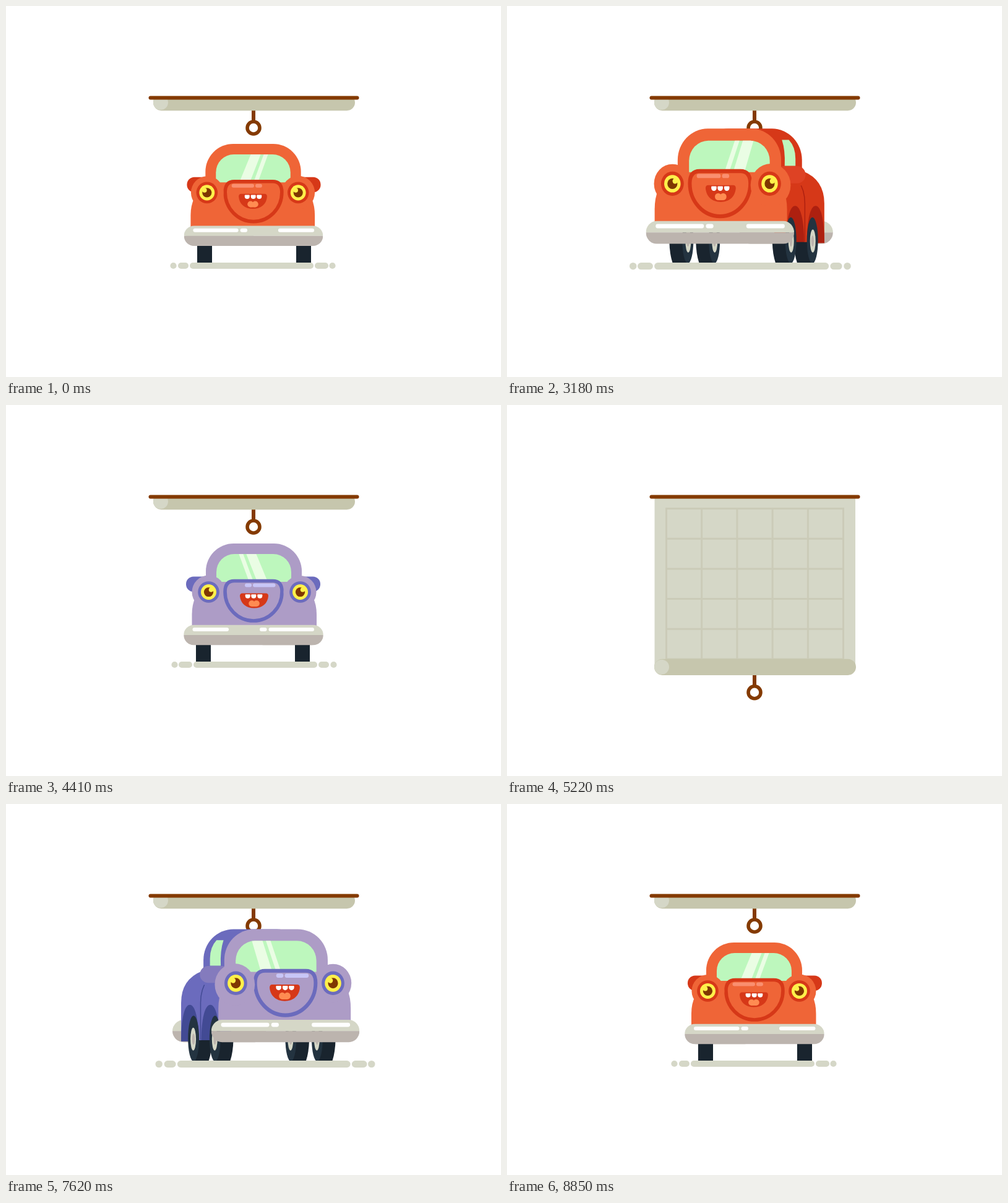
Recreate the animation shown at these times as an HTML page with a canvas. Size 800 by 600 pixels, loop 8880 ms.

```html
<!DOCTYPE html>
<html lang="en">
<head>
<meta charset="utf-8">
<title>Car blueprint</title>
<style>
html, body { margin: 0; width: 100%; height: 100%; overflow: hidden; background: #fff; }
canvas { display: block; }
</style>
</head>
<body>
<canvas id="stage" width="800" height="600"></canvas>
<script>
const ctx = document.getElementById('stage').getContext('2d');
const LOOP = 8880, HALF = 4460, SETTLED = 4440;

const RED = { main: '#ef6537', dark: '#d63818', deep: '#ad2010', mid: '#de4224', shine: '#fa8f70', flipHood: false };
const PURPLE = { main: '#ad9cc6', dark: '#6b6bbd', deep: '#424a94', mid: '#847bbd', shine: '#c8c6f7', flipHood: true };
const PAPER = '#d5d7c7', ROLL = '#c6c6ad', GRID = '#cbcbb8', WOOD = '#843a00';
const STEEL = '#bcb4ae', TYRE = '#19242e', TYRE_SIDE = '#233340', GLASS = '#bdf7bd';

const clamp = u => Math.max(0, Math.min(1, u));
const span = (t, a, b) => clamp((t - a) / (b - a));
const smooth = u => u * u * (3 - 2 * u);
const cubic = u => u < .5 ? 4 * u ** 3 : 1 - 4 * (1 - u) ** 3;
const mix = (a, b, u) => a + (b - a) * u;

function group(draw) { ctx.save(); draw(); ctx.restore(); }

function box(x1, y1, x2, y2, color, r = 0) {
  ctx.fillStyle = color;
  ctx.beginPath();
  ctx.roundRect(x1, y1, x2 - x1, y2 - y1, r);
  ctx.fill();
}
const pill = (x1, y1, x2, y2, color) => box(x1, y1, x2, y2, color, (y2 - y1) / 2);

function oval(x, y, rx, ry, color) {
  ctx.fillStyle = color;
  ctx.beginPath();
  ctx.ellipse(x, y, Math.max(rx, 0), ry, 0, 0, 7);
  ctx.fill();
}
const disc = (x, y, r, color) => oval(x, y, r, r, color);

function shape(d, color) {
  ctx.fillStyle = color;
  ctx.fill(new Path2D(d));
}
function line(d, color, width) {
  ctx.strokeStyle = color;
  ctx.lineWidth = width;
  ctx.stroke(new Path2D(d));
}

/* ---------- car: x = 0 is its middle, y = 0 the ground, facing right ---------- */

function shadow(p) {
  const e = 25 * p;
  pill(-103 - e, 0, 97 + e, 10, PAPER);
  pill(-122 - e, 0, -105 - e, 10, PAPER);
  pill(99 + e, 0, 121 + e, 10, PAPER);
  disc(-129.5 - e, 5, 5.1, PAPER);
  disc(127.5 + e, 5, 5.1, PAPER);
}

// edge is the outer left side of the tyre; the tread runs to its right, below the body
function wheel(edge, p) {
  const w = mix(24, 26, p), rx = 8 * p;
  ctx.save();
  ctx.beginPath();
  ctx.rect(-200, -70, 400, 70);
  ctx.clip();
  shape(`M${edge} -29.500H${edge + w + .5 * p}Q${edge + w} -12 ${edge + w - 4 * p} 0H${edge}Z`, TYRE);
  oval(edge, -32, rx, 33, TYRE_SIDE);
  oval(edge - .5 * p, -31, 4 * p, 16.5, PAPER);
  oval(edge - .2 * p, -31, 2 * p, 8, STEEL);
  ctx.restore();
}

function bumper(x1, x2) {
  group(() => {
    ctx.beginPath();
    ctx.roundRect(x1, -59.2, x2 - x1, 32.4, 16.2);
    ctx.clip();
    ctx.fillStyle = PAPER;
    ctx.fillRect(x1, -60, x2 - x1, 17);
    ctx.fillStyle = STEEL;
    ctx.fillRect(x1, -43, x2 - x1, 17);
  });
}

function side(c, p) {
  const back = mix(-94, -122, p), x = v => mix(v + 20, v, p);
  bumper(mix(-110, -134.5, p), 0);
  if (p > .02) {
    shape(`M-50 -130H${x(-92)}Q${back} -118 ${back} -84V-28H-50Z`, c.dark);
    for (const [m, hw] of [[-80, 13], [-109.5, 12.5]]) {
      const a = x(m) - hw * p, b = x(m) + hw * p;
      shape(`M${a} -28C${a} -60 ${x(m) - 8 * p} -81 ${x(m)} -81S${b} -60 ${b} -28Z`, c.deep);
    }
    line(`M${x(-84)} -118Q${x(-94)} -104 ${x(-94)} -84V-30`, c.deep, 1.3);
  }
}

function cabinShape(color) {
  shape('M-78 -110V-146A45 45 0 0 1 -33 -191H32A45 45 0 0 1 77 -146V-110Z', color);
}

function cabin(c, p) {
  if (p > .02) {
    group(() => {
      ctx.translate(-15 * p, 0);
      ctx.scale(1 - .04 * p, 1);
      cabinShape(c.dark);
    });
    ctx.globalAlpha = clamp(p * 3 - 1);
    shape('M-61 -175H-71Q-80.5 -165 -80.5 -148V-138H-65Q-66 -160 -61 -175Z', GLASS);
    ctx.globalAlpha = 1;
  }
  const m = mix(-108, -95, p);
  box(m, -137.5, -50, -113, p > .5 ? c.mid : c.dark, 12);
  box(40, -137.5, mix(109, 82, p), -113, c.dark, 12);
  group(() => {
    ctx.translate(15 * p, 0);
    ctx.scale(1 - .04 * p, 1);
    cabinShape(c.main);
    const d = 'M-61 -125V-145A29 29 0 0 1 -32 -174H31A29 29 0 0 1 60 -145V-125Z';
    shape(d, GLASS);
    ctx.clip(new Path2D(d));
    const k = -33 * p;
    shape(`M${-4 + k} -175H${12 + k}L-6 -129H-23Z`, '#eafde4');
    shape(`M${17 + k} -175H${24 + k}L7 -129H0Z`, '#eafde4');
  });
}

function eye(x, c) {
  disc(x, -112.5, 17.3, c.dark);
  disc(x, -112.5, 12.5, '#fff04a');
  disc(x, -112.5, 7.6, '#7f3700');
  disc(x - 4, -116.3, 3.8, '#fff04a');
}

function mouth() {
  shape('M-20 -110.5H18Q22 -110.5 22 -106C21 -94 12 -86.5 -1 -86.5S-23 -94 -24 -106Q-24 -110.5 -20 -110.5Z', '#d63818');
  for (const x of [-10.3, -.3, 9.3]) box(x - 4, -108.8, x + 4, -102.3, '#fff', [1, 1, 4, 4]);
  disc(-4.8, -94, 5, '#ff8c52');
  disc(2.8, -94, 5, '#ff8c52');
  box(-5, -95, 3, -89, '#ff8c52');
}

function front(c, p, dir) {
  const facing = flip => ctx.scale(flip ? -dir : dir, 1);
  ctx.translate(28 * p, 0);
  ctx.scale(1 - .055 * p, 1);
  box(-76, -129, 74, -58, c.main);
  shape('M-96 -104Q-102 -92 -102 -76V-50H99.500V-76Q99.500 -92 94 -104Z', c.main);
  disc(72.5, -112.5, 27 + p, c.main);
  const hood = 'M-31 -130.500H31Q46 -130.500 46 -113A46 47 0 0 1 -46 -113Q-46 -130.500 -31 -130.500Z';
  shape(hood, c.main);
  line(hood, c.dark, 5.6);
  group(() => {
    facing(c.flipHood);
    pill(-35.5, -126.5, 1, -120.5, c.shine);
    pill(3, -126.5, 14, -120.5, c.shine);
  });
  disc(-75 - 2 * p, -112.5 + 2 * p, 26.5 + 4 * p, c.main);
  eye(-75.5, c);
  eye(72.5, c);
  mouth();
  bumper(-112.8, 112.8);
  group(() => {
    facing(c.flipHood && dir < 0);
    for (const [a, b] of [[-98, -24.5], [-21.5, -10], [40, 98.5]]) pill(a, -55, b, -49, '#fff');
  });
}

function car(c, x, dir, scale, p, sway) {
  group(() => {
    ctx.translate(x, 415);
    ctx.scale(dir * scale, scale);
    shadow(p);
    wheel(mix(69, 36, p), p);
    wheel(mix(69, 74, p), p);
    const body = draw => group(() => { ctx.scale(1 - sway * .7, 1 + sway); draw(); });
    body(() => side(c, p));
    wheel(mix(-91, -104.5, p), p);
    wheel(mix(-91, -73.5, p), p);
    body(() => { cabin(c, p); front(c, p, dir); });
  });
}

/* ---------- pull-down screen with the drawing ---------- */

// path, start time of its pen
const strokes = [
  ['M477 253V244A44 44 0 0 0 433 200.500H364A44 44 0 0 0 320 244V253', 1006],
  ['M460 255V244A27 27 0 0 0 433 216.500H364A27 27 0 0 0 337 244V254', 1006],
  ['M510 331.500A16.500 16.500 0 0 1 510 364.500H291A16.500 16.500 0 0 1 291 331.500H510', 848],
  ['M399 324.500A47 47 0 0 0 446 278Q446 262 433 262H364Q351.500 262 351.500 278A47 47 0 0 0 399 324.500', 848],
  ['M285.500 331V307Q286 284 303 271A27 27 0 0 1 349 262H449A27 27 0 0 1 495 271Q514 284 514.500 307V331', 961],
  ['M298 276Q293 272 293 265Q293 253.500 304 253.500H317', 895],
  ['M501.500 276Q506.500 272 506.500 265Q506.500 253.500 494 253.500H480', 865],
  ['M341 278.500A12.800 12.800 0 0 0 315.400 278.500A12.800 12.800 0 0 0 341 278.500', 860],
  ['M482 278.500A12.800 12.800 0 0 0 456.400 278.500A12.800 12.800 0 0 0 482 278.500', 950],
  ['M288 365V387Q288 392.500 293 392.500H310Q315 392.500 315 387V365', 1006],
  ['M487 365V387Q487 392.500 492 392.500H509Q514 392.500 514 387V365', 948]
].map(([d, start]) => {
  const el = document.createElementNS('http://www.w3.org/2000/svg', 'path');
  el.setAttribute('d', d);
  return { path: new Path2D(d), length: el.getTotalLength(), start };
});

function trim(s, from, to, color) {
  if (to - from < .002) return;
  ctx.strokeStyle = color;
  ctx.setLineDash([(to - from) * s.length, s.length * 2]);
  ctx.lineDashOffset = -from * s.length;
  ctx.stroke(s.path);
}

function drawing(t) {
  const PEN = 1186, LAG = 198;
  ctx.lineCap = 'round';
  ctx.lineWidth = 2.8;
  const ends = strokes.map(s => [0, LAG].map(lag => smooth(span(t, s.start + lag, s.start + lag + PEN))));
  strokes.forEach((s, i) => trim(s, 0, ends[i][1], '#b5aa8c'));
  strokes.forEach((s, i) => trim(s, ends[i][1], ends[i][0], '#ffffe7'));
}

function screen(t) {
  const drop = 283 * (cubic(span(t, 60, 980)) - cubic(span(t, 2400, 2850)));
  const y = 156 + drop;
  line(`M400 ${y + 10}V${y + 32}`, WOOD, 6);
  line(`M410 ${y + 41}a10 10 0 1 1 -20 0a10 10 0 1 1 20 0`, WOOD, 5.6);
  group(() => {
    ctx.beginPath();
    ctx.rect(230, 148, 340, 400);
    ctx.clip();
    group(() => {
      ctx.beginPath();
      ctx.rect(238.5, 148, 324.5, y - 148);
      ctx.clip();
      box(238, 148, 564, y, PAPER);
      line('M257.500 167.500H543.500V411H257.500Z', GRID, 3);
      for (let i = 1; i < 5; i++) {
        const gx = 257.5 + 57.2 * i, gy = 167.5 + 48.7 * i;
        line(`M${gx} 167V411M257 ${gy}H544`, GRID, 3);
      }
      drawing(t);
    });
    pill(238, y - 13, 564, y + 13.2, ROLL);
    disc(250, y, 12, PAPER);
  });
  pill(230.5, 145.5, 570.5, 151.5, WOOD);
}

/* ---------- timeline ---------- */

function cars(t, h, sway) {
  const [now, next] = h ? [PURPLE, RED] : [RED, PURPLE];
  const exit = h ? 1 : -1;
  const dir = t < 1600 ? -exit : exit;
  const gone = 580 * (Math.max(0, t - 2852) / 948) ** 3;
  if (gone < 640) {
    car(now, 400 + exit * gone, dir, 1 + .3 * smooth(span(t, 2730, 3730)), smooth(span(t, 2750, 3160)), sway);
  }
  if (t > 3150) {
    const left = 140 * (Math.max(0, SETTLED - t) / 750) ** 3;
    const ease = smooth(span(t, 3550, 4400));
    car(next, 400 - exit * left, exit, 1.3 - .3 * ease, 1 - smooth(span(t, 3750, 4390)), sway);
  }
}

function render(time) {
  const h = time >= HALF ? 1 : 0, t = time - h * HALF;
  const sway = .008 * Math.cos(2 * Math.PI * (time - 30) / 240);
  ctx.fillStyle = '#fff';
  ctx.fillRect(0, 0, 800, 600);
  if (t < 2850) {
    cars(t, h, sway);
    screen(t);
  } else {
    screen(t);
    cars(t, h, sway);
  }
}

const began = performance.now();
function tick() {
  render((performance.now() - began) % LOOP);
  requestAnimationFrame(tick);
}
tick();
</script>
</body>
</html>
```
